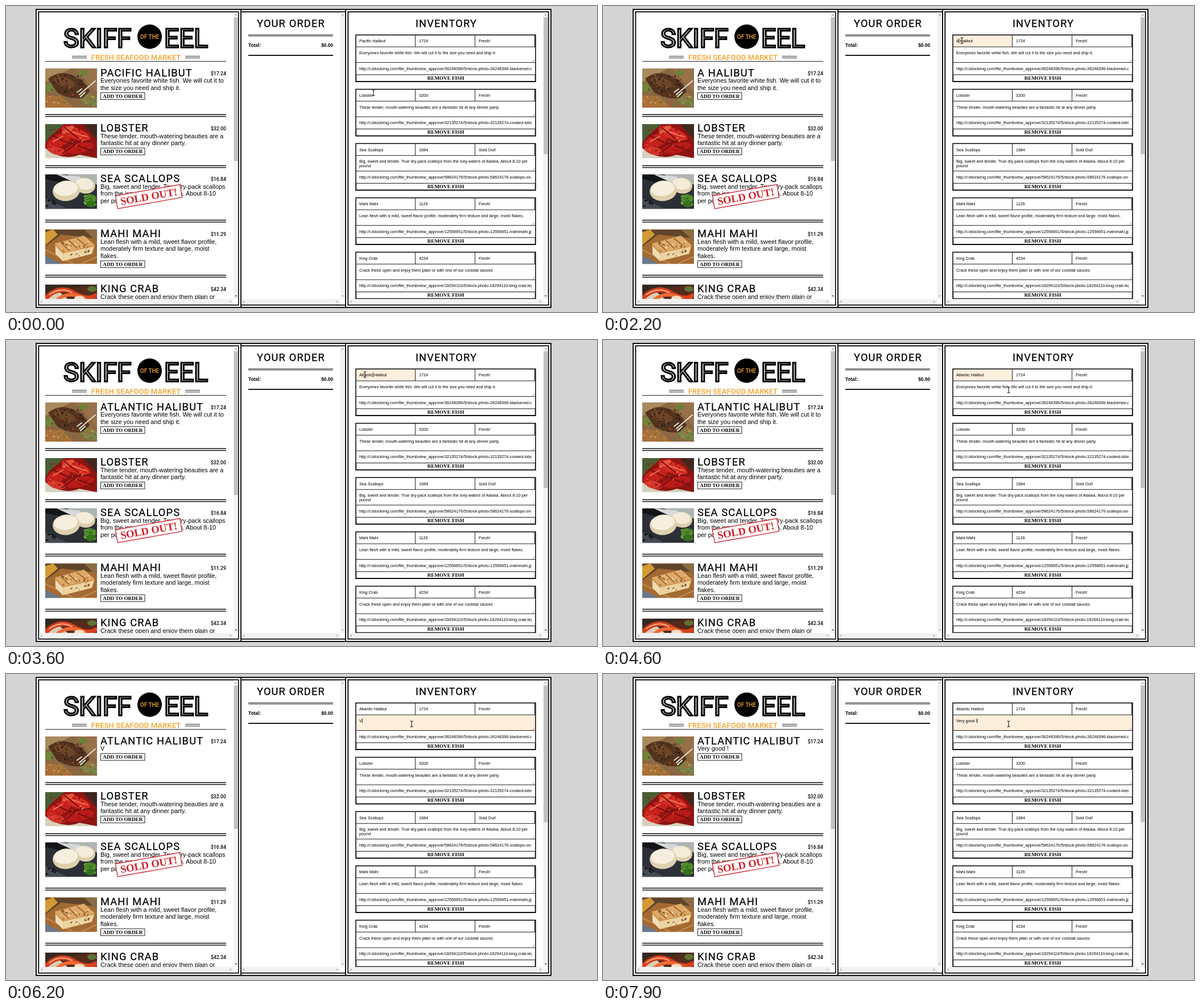
These frames come from a looping animation (1039x539 px, 8000 ms). An HTML page:

```html
<!DOCTYPE html>
<html lang="en">
<head>
<meta charset="utf-8">
<title>Seafood market</title>
<style>
html, body { margin: 0; width: 100%; height: 100%; overflow: hidden; background: #d4d4d4; }
svg { display: block; }
text { white-space: pre; fill: #000; }
.head { font: 400 18.3px Roboto, sans-serif; letter-spacing: 1.15px; stroke: #000; stroke-width: .25; }
.price { font: 500 8.7px Roboto, sans-serif; text-anchor: end; }
.name { font: 400 46px Roboto, sans-serif; fill: #fff; stroke: #000; stroke-width: 3; }
.of { font: 500 10px Roboto, sans-serif; fill: #f2a32c; text-anchor: middle; }
.tag { font: 500 13px Roboto, sans-serif; fill: #f2a32c; letter-spacing: .1px; text-anchor: middle; }
.body { font: 10.88px "Liberation Sans", Arial, sans-serif; }
.field { font: 7.26px "Liberation Sans", Arial, sans-serif; }
.total { font: 700 8.3px "Liberation Sans", Arial, sans-serif; }
.btn { font: 700 9.1px "Liberation Serif", serif; text-anchor: middle; }
.sold { font: 700 18.5px "Liberation Serif", serif; fill: #d12028; text-anchor: middle; }
.mid { text-anchor: middle; }
.end { text-anchor: end; }
</style>
</head>
<body>
<svg id="stage" width="1039" height="539" viewBox="0 0 1039 539"></svg>
<script>
const stage = document.getElementById('stage');
const LOOP = 8000;

const text = (x, y, str, cls, extra = '') => `<text x="${x}" y="${y}" class="${cls}" ${extra}>${str}</text>`;
const rect = (x, y, w, h, fill, extra = '') => `<rect x="${x}" y="${y}" width="${w}" height="${h}" fill="${fill}" ${extra}/>`;
const path = (d, fill, extra = '') => `<path d="${d}" fill="${fill}" ${extra}/>`;
const line = (d, color, width) => path(d, 'none', `stroke="${color}" stroke-width="${width}" stroke-linecap="round"`);
const blob = (x, y, rx, ry, fill, turn = 0) =>
  `<ellipse cx="${x}" cy="${y}" rx="${rx}" ry="${ry}" fill="${fill}" transform="rotate(${turn} ${x} ${y})"/>`;

// Seeded flecks scattered over a photo area
function flecks(count, x, y, w, h, colors) {
  let seed = count * 97 + w;
  const random = () => (seed = seed * 16807 % 2147483647) / 2147483647;
  let out = '';
  for (let i = 0; i < count; i++)
    out += blob(x + random() * w, y + random() * h, 1 + random() * 2, .6 + random(), colors[i % colors.length], random() * 180);
  return out;
}

// Photos, each drawn in a 91 px wide box
const photos = [
  rect(0, 0, 91, 69, '#8a6843') + path('M0 0H45L0 24z', '#a98a5c') + path('M52 0H91V42L70 20z', '#97714a') +
  path('M0 47L30 50 50 69H0z', '#a8713a') + blob(9, 34, 10, 8, '#71843a') + blob(78, 56, 17, 10, '#7d8248', 20) +
  path('M5 18Q25 2 48 12 70 20 78 40L66 52Q40 56 20 41z', '#54331f') + blob(34, 24, 20, 8, '#6d4526', 18) +
  flecks(45, 10, 12, 58, 32, ['#2d1a12', '#7d5637', '#3d2417']) +
  flecks(30, 0, 46, 91, 22, ['#c0462a', '#c99a4f', '#5f7335']) +
  line('M60 46L88 22M62 50l8-8M56 42l8-6', '#e3dfd2', 2) + blob(66, 8, 8, 5, '#6c8138'),

  rect(0, 0, 91, 60, '#8d1512') + path('M0 0H34L8 22 0 34z', '#4a5f35') + path('M66 0H91V28z', '#40281f') +
  path('M0 42Q30 66 60 54L91 60H0z', '#d6d0bd') + blob(24, 30, 24, 11, '#c5211b', -28) + blob(54, 17, 27, 10, '#d52b22', 22) +
  blob(60, 42, 26, 9, '#b91b18', -12) + blob(20, 47, 16, 7, '#d6352a', 14) + blob(40, 10, 12, 5, '#e5573d', -30) +
  line('M12 20L42 34 78 29M30 52L52 36 84 48M34 6L64 30', '#70100f', 2) + line('M48 14l24 8M14 31l17-10', '#f07a5a', 2) +
  flecks(30, 8, 8, 76, 42, ['#8a1210', '#e85c45', '#a51814']),

  rect(0, 0, 91, 61, '#2c3036') + path('M38 0H91V18L52 9z', '#aeb5b0') + path('M0 0H20L52 15 48 20 0 8z', '#121417') +
  path('M20 0L60 4 76 17 50 14z', '#d5d9da') + path('M0 42L40 61H0z', '#454a52') +
  blob(70, 20, 18, 14, '#ddcfae', 8) + blob(69, 17, 16, 10, '#f4ecd9', 8) +
  blob(37, 29, 24, 18, '#dfd0ae', -6) + blob(36, 25, 21, 13, '#f6efdf', -6) +
  blob(79, 43, 11, 8, '#4f8a2b') + blob(80, 52, 9, 6, '#35701d') +
  flecks(16, 69, 36, 20, 18, ['#79b342', '#2f641b']) + flecks(9, 3, 46, 24, 10, ['#0d0f11']),

  rect(0, 0, 91, 61, '#a36a33') + path('M0 0H91V16L28 9 0 30z', '#60452b') + path('M0 5L14 0 22 9 0 28z', '#d39a35') +
  path('M0 47L30 61H0z', '#68788c') + path('M68 0H91V22z', '#8a6b43') + line('M0 36L50 61M62 61L91 48', '#c58d4d', 2) +
  path('M17 25L68 11 87 28 82 43 31 56 18 43z', '#c88d4b') + path('M17 25L68 11 87 28 32 41z', '#dcaa68') +
  path('M18 29L32 44 31 56 18 43z', '#f0dcb4') + path('M32 42L86 30 82 43 31 56z', '#edd3a0') +
  line('M28 24l14 13M42 20l14 13M56 16l15 12', '#a9652f', 2) + flecks(26, 30, 22, 48, 26, ['#7a512b', '#f3dfb6', '#b97a3c']),

  rect(0, 0, 91, 61, '#33271f') + path('M0 15Q20 0 45 6L91 0V26H0z', '#552b1c') + path('M0 20L26 14 40 26H0z', '#d8cdb8') +
  line('M3 22Q26 1 50 15T88 20', '#d9401f', 8) + line('M20 28Q40 10 70 25', '#ee6a35', 6) +
  line('M7 18Q27 4 47 14', '#f5b184', 2) + blob(82, 8, 8, 5, '#5b7437') + blob(60, 24, 9, 4, '#f3dfc2')
];

const fish = [
  { name: 'Pacific Halibut', cents: 1724, y: 110, h: 69, head: 123.5, rule: 191,
    lines: ['Everyones favorite white fish. We will cut it to', 'the size you need and ship it.'], link: '36248396 blackened-cod' },
  { name: 'Lobster', cents: 3200, y: 208, h: 60, head: 221, rule: 281,
    lines: ['These tender, mouth-watering beauties are a', 'fantastic hit at any dinner party.'], link: '32135274 cooked-lobster' },
  { name: 'Sea Scallops', cents: 1684, y: 296.5, h: 61, head: 310, rule: 377, sold: true, wrap: ' pound',
    lines: ['Big, sweet and tender. True dry-pack scallops', 'from the icey waters of Alaska. About 8-10', 'per pound'], link: '58624176 scallops-on-slate' },
  { name: 'Mahi Mahi', cents: 1129, y: 393.5, h: 61, head: 407, rule: 474,
    lines: ['Lean flesh with a mild, sweet flavor profile,', 'moderately firm texture and large, moist', 'flakes.'], link: '12556651 mahimahi.jpg' },
  { name: 'King Crab', cents: 4234, y: 490.5, h: 61, head: 504,
    lines: ['Crack these open and enjoy them plain or', 'with one of our cocktail sauces'], link: '18294110 king-crab-legs' }
];

const bodyLines = (lines, y) => lines.map((s, i) => text(166, y + i * 12.6, s, 'body')).join('');
const addButton = y => rect(166.5, y - 6, 77.5, 12, '#fff', 'stroke="#222"') + text(205.3, y + 3.1, 'ADD TO ORDER', 'btn');

function menuItem(f, i) {
  const y = f.head + 11.7;
  return `<svg x="69" y="${f.y}" width="91" height="${f.h}">${photos[i]}</svg>` +
    text(166, f.head, f.name.toUpperCase(), 'head', `id="head${i}"`) +
    text(387, f.head - 2, '$' + (f.cents / 100).toFixed(2), 'price') +
    `<g id="desc${i}">${bodyLines(f.lines, y)}</g>` +
    (f.sold ? '' : `<g id="add${i}">${addButton(f.head + 10 + 12.6 * f.lines.length)}</g>`) +
    (f.rule ? rect(69, f.rule - .5, 318, 1.5, '#111') + rect(69, f.rule + 2.8, 318, 1.5, '#111') : '');
}

function stockForm(f, i) {
  const y = 50 + i * 95.65;
  const [id, slug] = f.link.split(' ');
  const full = f.lines.join(' ');
  const first = f.wrap ? full.slice(0, -f.wrap.length) : full;
  return (i ? '' : rect(615, 51, 105, 21, '#fff', 'id="nameBg"') + rect(615, 72, 316, 28, '#fff', 'id="noteBg"') +
      rect(0, 0, 0, 8.4, '#3390ff', 'id="mark"')) +
    rect(615, y + 1, 316, 82.3, 'none', 'stroke="#000" stroke-width="1.5"') +
    path(`M615 ${y + 22}h316M615 ${y + 49.5}h316M719.5 ${y + 1}v21M824.5 ${y + 1}v21M929.5 ${y + 1}v21`,
      'none', 'stroke="#222" stroke-width="1"') +
    rect(615.7, y + 71, 314.6, 11.6, 'none', 'stroke="#111" stroke-width="1"') +
    text(621, y + 14.2, f.name, 'field', `id="name${i}"`) + text(726, y + 14.2, f.cents, 'field') +
    text(831, y + 14.2, f.sold ? 'Sold Out!' : 'Fresh!', 'field') +
    text(621, y + 35, first, 'field', `id="note${i}"`) + (f.wrap ? text(621, y + 43, f.wrap.trim(), 'field') : '') +
    path(`M925 ${y + 48}l4-4M927.5 ${y + 48}l1.5-1.5`, 'none', 'stroke="#888" stroke-width=".7"') +
    `<g clip-path="url(#linkClip)">` +
    text(621, y + 62.8, `http://i.istockimg.com/file_thumbview_approve/${id}/5/stock-photo-${id}-${slug}`, 'field') + '</g>' +
    text(773, y + 79.8, 'REMOVE FISH', 'btn');
}

// Double-ruled page frame
const frame = (x, w) => rect(x + 1, 6, w - 2, 525, '#fff', 'stroke="#111" stroke-width="2"') +
  rect(x + 5.3, 10.3, w - 10.6, 516.4, '#fff', 'stroke="#111" stroke-width="2"');

function scrollbars(left, x, thumb) {
  const arrow = (cx, cy, turn, c) => path('M-2 1.2L0-1.3 2 1.2z', c, `transform="translate(${cx} ${cy}) rotate(${turn})"`);
  const mid = x + 4.2, dark = thumb ? '#505050' : '#a3a3a3';
  return rect(x, 11.3, 8, 514, '#f1f1f1') + rect(left, 516, x - left + 8, 9.3, '#f1f1f1') +
    rect(x, 516, 8, 9.3, '#fff') + (thumb ? rect(x + .7, 20, 7, thumb - 20, '#c1c1c1') : '') +
    arrow(mid, 15.5, 0, '#a3a3a3') + arrow(mid, 511, 180, dark) +
    arrow(left + 4, 520.7, -90, '#a3a3a3') + arrow(x - 5, 520.7, 90, '#a3a3a3');
}

stage.innerHTML = `
  <clipPath id="pageClip"><rect x="58" y="11" width="895" height="505"/></clipPath>
  <clipPath id="linkClip"><rect x="616" y="0" width="308" height="539"/></clipPath>` +
  frame(52, 362) + frame(596, 363) + rect(414, 5, 182, 527, '#fff') +
  [5, 9.3, 525.7, 530].map(y => rect(414, y, 182, 2, '#111')).join('') +
  '<g clip-path="url(#pageClip)">' +
  text(101, 73, 'SKIFF', 'name') + text(278, 73, 'EEL', 'name') +
  '<circle cx="252.5" cy="54" r="21.5"/>' + text(252.5, 57.5, 'OF THE', 'of') +
  text(228.5, 94.6, 'FRESH SEAFOOD MARKET', 'tag') +
  path('M116 88.5h26M116 91.5h26M315 88.5h26M315 91.5h26M69 97.5h318', 'none', 'stroke="#222" stroke-width="1"') +
  fish.map(menuItem).join('') +
  '<g transform="translate(251 335.7) rotate(-10)">' + rect(-57.5, -11.5, 115, 23, '#fff', 'stroke="#d12028" stroke-width="1.3"') +
  text(0, 6.2, 'SOLD OUT!', 'sold') + '</g>' +
  text(501, 36.5, 'YOUR ORDER', 'head mid') +
  rect(426, 50.2, 149, 1.1, '#333') + rect(426, 52.3, 149, 1.1, '#333') + rect(426, 86, 149, 1.8, '#000') +
  text(426, 72, 'Total:', 'total') + text(575, 72, '$0.00', 'total end') +
  text(774, 36.5, 'INVENTORY', 'head mid') +
  fish.map(stockForm).join('') + '</g>' +
  scrollbars(58.3, 400, 273) + scrollbars(414, 587.5) + scrollbars(602.3, 944.5, 261) +
  rect(0, 0, .8, 8.5, '#000', 'id="caret"') +
  `<g id="cursor" fill="none"><path d="M-2.5-5h1.5L0-4 1-5h1.5M0-4V4M-2.5 5h1.5L0 4 1 5h1.5" stroke="#fff" stroke-width="2" opacity=".6"/>
   <path d="M-2.5-5h1.5L0-4 1-5h1.5M0-4V4M-2.5 5h1.5L0 4 1 5h1.5" stroke="#111" stroke-width="1.1"/></g>`;

const el = Object.fromEntries([...stage.querySelectorAll('[id]')].map(n => [n.id, n]));

// Pointer moves: start time, then one position every 100 ms
const moves = [
  [0, [646, 153]],
  [200, [645, 161], [646, 154], [646, 146]],
  [600, [650, 140], [657, 126], [660, 110], [657, 93], [650, 79], [642, 69], [635, 63], [631, 61]],
  [3900, [638, 60], [660, 60], [694, 63], [727, 69], [745, 78], [736, 85], [720, 88], [713, 88]]
];
const nameKeys = [2200, 2400, 2700, 2900, 3000, 3300, 3500, 3600];
const noteKeys = [6200, 6500, 6700, 6800, 6900, 7000, 7100, 7300, 7400, 7500, 7900];
const note = fish[0].lines.join(' ');
const fishWord = note.indexOf('fish');

const typed = (str, keys, t) => str.slice(0, keys.filter(k => k <= t).length);
const put = (node, attrs) => { for (const k in attrs) node.setAttribute(k, attrs[k]); };

function pointer(t) {
  const [start, ...spots] = moves.filter(m => m[0] <= t).pop();
  return spots[Math.min(spots.length - 1, Math.floor((t - start) / 100))];
}

// Selected range as [start, end]; equal ends give a caret, null gives neither
function selection(t, newName, newNote) {
  if (t < 1500) return null;
  if (t < 1600) return [2, 2];
  if (t < 2200) return [0, 7];
  if (t < 4100) return [newName.length, newName.length];
  if (t < 4800) return null;
  if (t < 5000) return [fishWord + 4, fishWord + 4];
  if (t < 5100) return [fishWord, fishWord + 4];
  if (t < 6200) return [0, note.length];
  return [newNote.length, newNote.length];
}

function fill(node, str, range) {
  if (!range || range[0] === range[1]) { node.textContent = str; return; }
  const [a, b] = range;
  node.innerHTML = `${str.slice(0, a)}<tspan fill="#fff">${str.slice(a, b)}</tspan>${str.slice(b)}`;
}

let last = '';
function draw(t) {
  const newName = typed('Atlantic', nameKeys, t), newNote = typed('Very good !', noteKeys, t);
  const name = (newName || 'Pacific') + ' Halibut';
  const range = selection(t, newName, newNote);
  const inNote = t >= 4800, inName = t >= 1500 && !inNote;
  const [x, y] = pointer(t);
  const key = [name, newNote, range, inNote, inName, x, y].join('|');
  if (key === last) return;
  last = key;

  put(el.cursor, { transform: `translate(${x} ${y})` });
  put(el.nameBg, { fill: inName ? '#feefdc' : '#fff' });
  put(el.noteBg, { fill: inNote ? '#feefdc' : '#fff' });
  el.head0.textContent = name.toUpperCase();
  const lines = newNote ? [newNote] : fish[0].lines;
  el.desc0.innerHTML = bodyLines(lines, fish[0].head + 11.7);
  el.add0.innerHTML = addButton(fish[0].head + 10 + 12.6 * lines.length);
  fill(el.name0, name, inName && range);
  fill(el.note0, newNote || note, inNote && range);

  const field = inNote ? el.note0 : el.name0;
  const at = n => 621 + (n ? field.getSubStringLength(0, n) : 0);
  const top = inNote ? 78 : 57.3;
  const [a, b] = range || [0, 0];
  put(el.mark, { x: at(a), y: top, width: at(b) - at(a) });
  put(el.caret, { x: at(b), y: top, visibility: range && a === b ? 'visible' : 'hidden' });
}

const began = performance.now();
function tick() {
  draw((performance.now() - began) % LOOP);
  requestAnimationFrame(tick);
}
tick();
</script>
</body>
</html>
```
